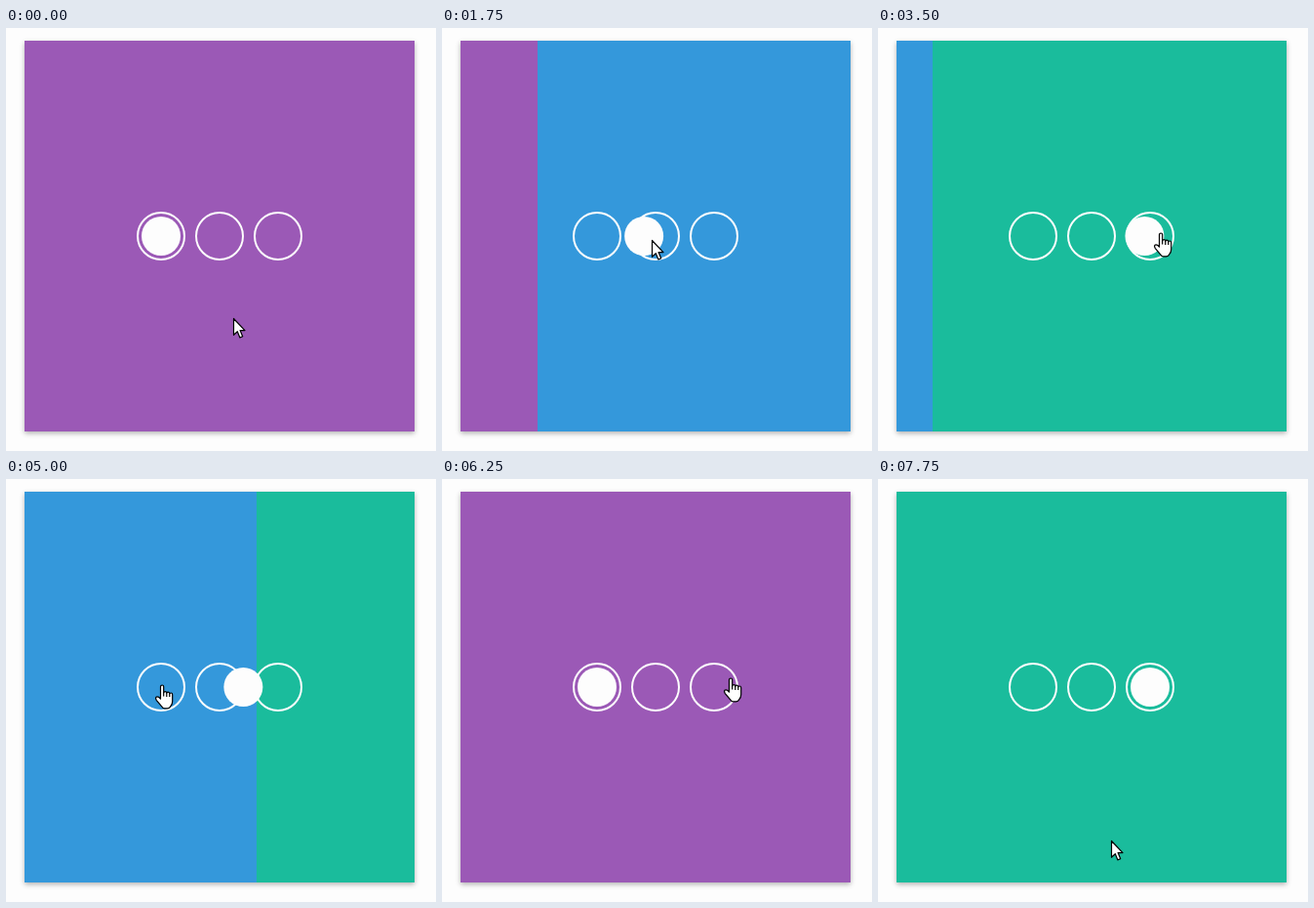
Recreate the animation shown at these times as an HTML page. Size 441 px wide and 433 px high, loop 8000 ms.

```html
<!DOCTYPE html>
<html lang="en">
<head>
<meta charset="utf-8">
<title>Sliding panels</title>
<style>
  @property --p { syntax: "<number>"; inherits: true; initial-value: 0; }

  html, body { margin: 0; width: 100%; height: 100%; overflow: hidden; background: #fdfdfd; }

  #card {
    position: absolute; left: 19px; top: 13px; width: 400px; height: 400px;
    overflow: hidden; box-shadow: 0 2px 5px rgba(0, 0, 0, .3);
    animation: slide 8s infinite;
  }
  #strip {
    width: 1200px; height: 400px;
    background: linear-gradient(90deg, #9b59b6 400px, #3498db 400px 800px, #1abc9c 800px);
    transform: translateX(round(var(--p) * -400px, 1px));
  }

  .ring, #dot { position: absolute; box-sizing: border-box; border-radius: 50%; }
  .ring { left: calc(115px + var(--i) * 60px); top: 175px; width: 50px; height: 50px; border: 2px solid #fdfdfd; }
  #dot { left: 120px; top: 180px; width: 40px; height: 40px; background: #fdfdfd; transform: translateX(calc(var(--p) * 60px)); }

  #cursor {
    position: absolute; left: 0; top: 0; width: 1px; height: 1px; overflow: visible;
    animation: roam 8s linear infinite;
  }
  #cursor path { fill: #fff; stroke: #000; stroke-width: 1.2; stroke-linejoin: round; }
  #cursor .knuckles { fill: none; }
  #hand, .over #arrow { display: none; }
  .over #hand { display: inline; }

  /* --p is the active panel; each slide lasts one second */
  @keyframes slide {
    0%, 15.625% { --p: 0; }
    28.125%, 35.8125% { --p: 1; }
    48.3125%, 59.99% { --p: 2; }
    72.49%, 79.575% { --p: 0; }
    92.075%, 100% { --p: 2; }
  }
  @keyframes roam {
    0% { translate: 233px 297px; }
    3.125% { translate: 242px 264px; }
    9.375%, 28.125% { translate: 215px 217px; }
    34.375%, 46.875% { translate: 290px 209px; }
    56.25%, 71.875% { translate: 160px 210px; }
    78.125%, 90.625% { translate: 296px 203px; }
    96.875%, 100% { translate: 239px 370px; }
  }
</style>
</head>
<body>
<div id="card">
  <div id="strip"></div>
  <div class="ring" style="--i:0"></div>
  <div class="ring" style="--i:1"></div>
  <div class="ring" style="--i:2"></div>
  <div id="dot"></div>
</div>
<svg id="cursor">
  <path id="arrow" d="M.5.5V17.3L4.3 13.7 6.9 19.9 9.7 18.7 7.1 12.6H12Z"/>
  <g id="hand" transform="translate(-7 .5)">
    <path d="M5.5 14.5V2.1a1.6 1.6 0 0 1 3.2 0V8.3q.3-1.2 1.6-1.2t1.5 1.6q.3-1 1.5-1t1.5 1.6q.4-.8 1.4-.8 1.5 0 1.5 1.8V17q0 3-2 5.2-.8 2.1-3 2.1H9.5q-2 0-3-2.2L1.2 15.8Q-.1 13.6 1.3 12.5 3.2 11.7 5.5 14.5Z"/>
    <path class="knuckles" d="M8.7 8v4M11.8 8.6V12.4M14.8 9.3V12.6"/>
  </g>
</svg>
<script>
  const LOOP = 8000, STEP = 250;
  const card = document.getElementById("card");
  const cursor = document.getElementById("cursor");
  const motions = document.getAnimations();
  motions.forEach(m => m.pause());

  function draw() {
    // the picture advances four times a second
    const time = Math.floor(performance.now() % LOOP / STEP) * STEP;
    motions.forEach(m => m.currentTime = time);

    // a hand over the rings, an arrow elsewhere and well inside the dot
    const panel = +getComputedStyle(card).getPropertyValue("--p");
    const [x, y] = getComputedStyle(cursor).translate.split(" ").map(parseFloat);
    const within = (slot, r) => Math.hypot(x - 159 - slot * 60, y - 213) < r;
    const over = [0, 1, 2].some(slot => within(slot, 25)) && !within(panel, 16);
    cursor.classList.toggle("over", over);
    requestAnimationFrame(draw);
  }
  draw();
</script>
</body>
</html>
```
